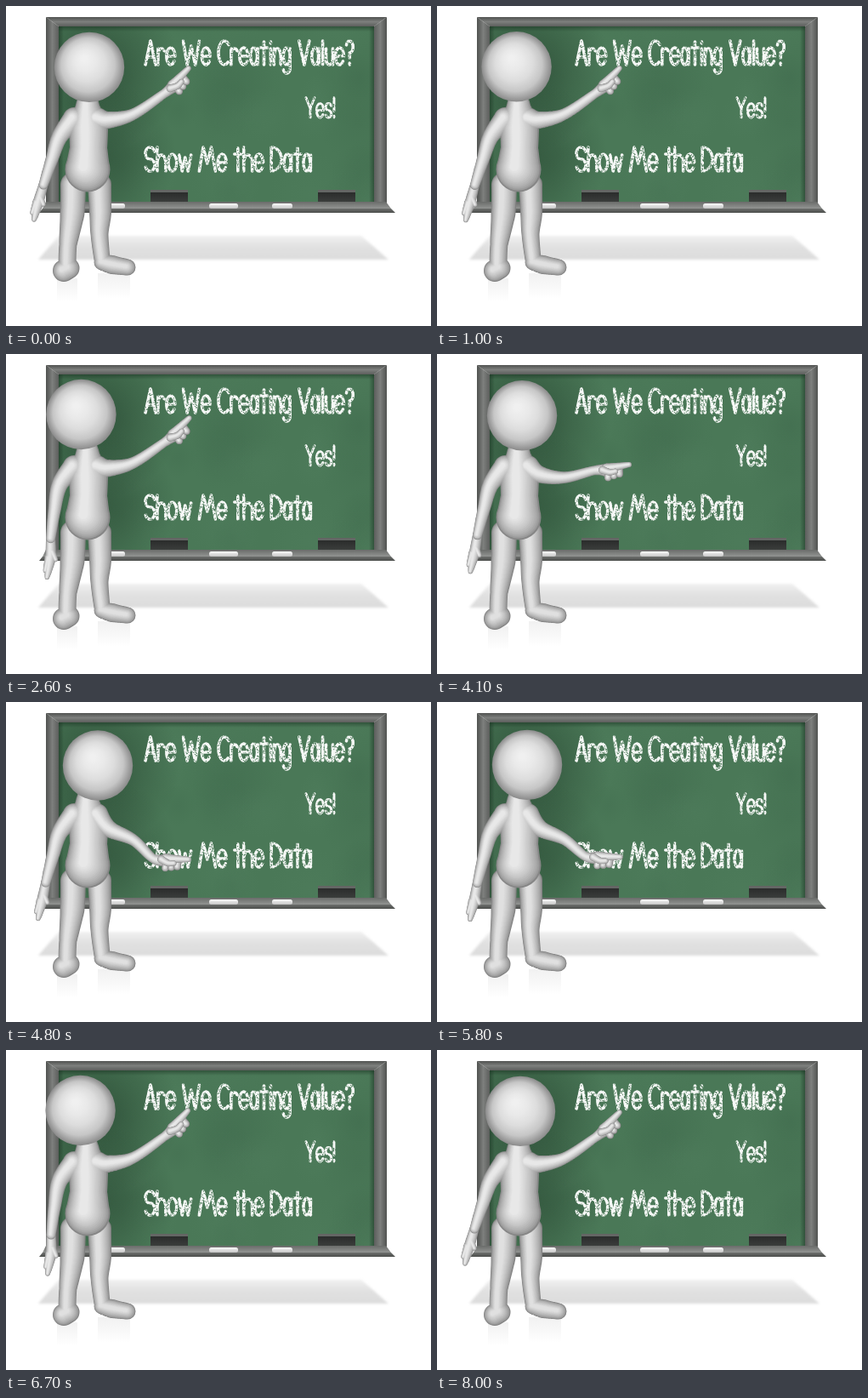
An HTML page with a canvas for the animation above (8.5 s loop, 500 by 376 pixels).

```html
<!DOCTYPE html>
<html lang="en">
<head>
<meta charset="utf-8">
<title>Chalkboard presenter</title>
<style>
html, body { margin: 0; width: 100%; height: 100%; overflow: hidden; background: #fff; }
canvas { display: block; }
</style>
</head>
<body>
<canvas id="stage" width="500" height="376" role="img"
  aria-label="Are We Creating Value? Yes! Show Me the Data"></canvas>
<script>
const W = 500, H = 376, LOOP = 8500, STEP = 100, TURN = Math.PI * 2;
const ctx = document.getElementById('stage').getContext('2d');

function layer() {
  const c = document.createElement('canvas');
  c.width = W;
  c.height = H;
  return c.getContext('2d');
}

let seed = 11;
function rnd() {
  seed = (seed * 16807) % 2147483647;
  return seed / 2147483647;
}

const mix = (a, b, u) => a + (b - a) * u;
const mixPoint = (a, b, u) => a.map((v, i) => mix(v, b[i], u));

function fade(g, x0, y0, x1, y1, ...stops) {
  const f = g.createLinearGradient(x0, y0, x1, y1);
  stops.forEach((c, i) => f.addColorStop(i / (stops.length - 1), c));
  return f;
}

function glow(g, x, y, r, rgb, alpha) {
  const f = g.createRadialGradient(x, y, 0, x, y, r);
  f.addColorStop(0, `rgba(${rgb},${alpha})`);
  f.addColorStop(1, `rgba(${rgb},0)`);
  box(g, x - r, y - r, r * 2, r * 2, f);
}

function box(g, x, y, w, h, fill) {
  g.fillStyle = fill;
  g.fillRect(x, y, w, h);
}

function poly(g, fill, ...p) {
  g.fillStyle = fill;
  g.beginPath();
  for (let i = 0; i < p.length; i += 2) g.lineTo(p[i], p[i + 1]);
  g.fill();
}

// Chalk hand: letters are built from a few strokes, heights measured up from the baseline
const CAP = 28, LOW = 19;
const stem = (x, top, foot = 0) => `M${x} ${-foot}V${-top}`;
const bar = (x, w, y) => `M${x} ${-y}h${w}`;
const zig = (w, ...ys) =>
  'M' + ys.map((y, i) => `${w * i / (ys.length - 1)} ${-y}`).join('L');
// Part of an oval, angles in turns from the right, anticlockwise
function curve(x, y, rx, ry, from, to) {
  const pts = [];
  for (let i = 0; i <= 14; i++) {
    const a = mix(from, to, i / 14) * TURN;
    pts.push(`${x + rx * Math.cos(a)} ${-y - ry * Math.sin(a)}`);
  }
  return 'M' + pts.join('L');
}
const ring = r => curve(r, 10, r, 10, 0, 1);
const arch = w => curve(w / 2, 9, w / 2, 10, 0.5, 0) + stem(w, 9);
const snake = (r, h) => curve(r, h * 0.75, r, h / 4, 0.05, 0.75) + curve(r, h / 4, r, h / 4, 0.25, -0.45);

const GLYPHS = {
  A: [12, zig(12, 0, CAP, 0) + bar(2, 8, 9)],
  C: [12, curve(7, 14, 7, 14, 0.12, 0.86)],
  D: [12, stem(0, CAP) + curve(0, 14, 12, 14, 0.25, -0.25)],
  M: [19, zig(19, 0, CAP, 9, CAP, 0)],
  S: [11, snake(5.5, CAP)],
  V: [12, zig(12, CAP, 0, CAP)],
  W: [19, zig(19, CAP, 0, 22, 0, CAP)],
  Y: [12, zig(12, CAP, 13, CAP) + stem(6, 13)],
  a: [9, ring(4) + stem(8.5, LOW)],
  e: [10, curve(5, 10, 5, 10, 0, 0.9) + bar(0, 10, 10)],
  g: [9, ring(4) + stem(8, LOW, -4) + curve(4, -4, 4, 6, 0, -0.45)],
  h: [10, stem(0, CAP) + arch(10)],
  i: [2, stem(1, LOW) + stem(1, 27, 25)],
  l: [2, stem(1, CAP)],
  n: [8, stem(0, LOW) + arch(8)],
  o: [10, ring(5)],
  r: [7, stem(0, LOW) + curve(4, 12, 4, 7, 0.5, 0.1)],
  s: [8, snake(4, 20)],
  t: [8, stem(4, 27) + bar(0, 8, 20)],
  u: [8, stem(0, LOW, 7) + curve(4, 7, 4, 7, 0.5, 1) + stem(8, LOW)],
  w: [14, zig(14, LOW, 0, 16, 0, LOW)],
  '?': [8, curve(4, 21, 4, 7, 0.45, -0.25) + stem(4, 14, 8) + stem(4, 2)],
  '!': [2, stem(1, CAP, 9) + stem(1, 2)]
};

function write(g, text, x, y, size = 1) {
  g.save();
  g.translate(x, y);
  g.scale(size, size);
  g.lineWidth = 3.6;
  for (const ch of text) {
    const [w, d] = ch === ' ' ? [3.8, ''] : GLYPHS[ch];
    g.stroke(new Path2D(d));
    g.translate(w + 2.9, 0);
  }
  g.restore();
}

function chalk() {
  const g = layer();
  g.strokeStyle = '#f6f8f6';
  g.lineCap = g.lineJoin = 'round';
  write(g, 'Are We Creating Value?', 164, 69);
  write(g, 'Yes!', 353, 131, 0.83);
  write(g, 'Show Me the Data', 164, 194);
  g.globalCompositeOperation = 'destination-out';
  for (let i = 0; i < 7000; i++) {
    g.fillRect(160 + rnd() * 254, 36 + rnd() * 164, 1.1, 1.1);
  }
  return g.canvas;
}

function eraser(g, x) {
  box(g, x, 216, 44, 4, '#646664');
  box(g, x, 219, 44, 12, fade(g, 0, 219, 0, 231, '#2a2c2b', '#3c3f3d'));
}

function stick(g, x, w) {
  g.fillStyle = fade(g, 0, 232, 0, 238, '#fafafa', '#c4c4c4');
  g.beginPath();
  g.roundRect(x, 232, w, 6, 2.5);
  g.fill();
}

function scene() {
  const g = layer();
  box(g, 0, 0, W, H, '#fff');

  // floor shadow and faint reflections of the feet
  g.filter = 'blur(1.5px)';
  poly(g, fade(g, 0, 268, 0, 299, '#f3f3f3', '#e0e0e0', '#dcdcdc'),
    62, 270, 418, 270, 450, 298, 38, 298);
  g.filter = 'none';
  box(g, 60, 320, 24, 28, fade(g, 0, 320, 0, 348, '#f1f1f1', '#ffffff'));
  box(g, 108, 314, 38, 30, fade(g, 0, 314, 0, 344, '#f1f1f1', '#ffffff'));

  // frame
  const rail = ['#505250', '#7d7f7d', '#5c5e5c'];
  poly(g, fade(g, 0, 13, 0, 24, ...rail), 47, 13, 448, 13, 433, 24, 62, 24);
  poly(g, fade(g, 47, 0, 62, 0, ...rail), 47, 13, 62, 24, 62, 232, 47, 237);
  poly(g, fade(g, 448, 0, 433, 0, ...rail), 448, 13, 433, 24, 433, 232, 448, 237);

  // board
  g.save();
  g.beginPath();
  g.rect(62, 24, 371, 207);
  g.clip();
  box(g, 62, 24, 371, 207, '#4a7857');
  for (let i = 0; i < 36; i++) {
    const tone = i % 2 ? '88,134,102' : '54,94,68';
    glow(g, 62 + rnd() * 371, 24 + rnd() * 207, 20 + rnd() * 40, tone, 0.16);
  }
  glow(g, 110, 75, 95, '24,48,32', 0.5);
  glow(g, 115, 175, 85, '24,48,32', 0.4);
  const dark = 'rgba(22,46,30,.5)', clear = 'rgba(22,46,30,0)';
  box(g, 62, 24, 371, 6, fade(g, 0, 24, 0, 30, dark, clear));
  box(g, 62, 24, 6, 207, fade(g, 62, 0, 68, 0, dark, clear));
  box(g, 427, 24, 6, 207, fade(g, 427, 0, 433, 0, clear, dark));
  g.restore();

  eraser(g, 170);
  eraser(g, 367);

  // tray
  poly(g, fade(g, 0, 230, 0, 238, '#6a6c6a', '#929492'),
    47, 230, 447, 230, 453, 238, 43, 238);
  poly(g, fade(g, 0, 238, 0, 243, '#6e706e', '#4b4d4b'),
    43, 238, 453, 238, 458, 243, 39, 243);
  stick(g, 117, 23);
  stick(g, 239, 34);
  stick(g, 313, 24);

  g.drawImage(chalk(), 0, 0);
  return g.canvas;
}

// Point along a Catmull-Rom spline through [x, y, r] points
function along(p, i, t) {
  const a = p[Math.max(i - 1, 0)], b = p[i], c = p[i + 1];
  const d = p[Math.min(i + 2, p.length - 1)];
  return b.map((v, k) => k === 2 ? mix(v, c[2], t) :
    v + 0.5 * t * (c[k] - a[k] + t * (2 * a[k] - 5 * v + 4 * c[k] - d[k] +
    t * (3 * (v - c[k]) + d[k] - a[k]))));
}

function sample(p) {
  const out = [];
  for (let i = 0; i < p.length - 1; i++) {
    const n = Math.ceil(Math.hypot(p[i + 1][0] - p[i][0], p[i + 1][1] - p[i][1])) + 1;
    for (let j = 0; j <= n; j++) out.push(along(p, i, j / n));
  }
  return out;
}

// Soft clay shading: shrinking, brightening copies of all tubes at once
function clay(tubes, rim = 134, core = 232) {
  const dots = tubes.flatMap(sample), passes = 14;
  for (let k = 0; k < passes; k++) {
    const u = k / (passes - 1), s = 1 - 0.8 * u;
    const v = Math.round(mix(rim, core, Math.pow(u, 0.6)));
    ctx.fillStyle = `rgb(${v},${v},${v})`;
    ctx.beginPath();
    for (const [x, y, r] of dots) {
      const cx = x - r * 0.19 * u, cy = y - r * 0.12 * u;
      ctx.moveTo(cx + r * s, cy);
      ctx.arc(cx, cy, r * s, 0, TURN);
    }
    ctx.fill();
  }
}

function head(x, y) {
  const f = ctx.createRadialGradient(x - 6, y - 10, 3, x, y, 41.2);
  ['#f0f0f0', '#e9e9e9', '#dddddd', '#c6c6c6', '#8a8a8a']
    .forEach((c, i) => f.addColorStop(i / 4, c));
  ctx.fillStyle = f;
  ctx.beginPath();
  ctx.arc(x, y, 41.2, 0, TURN);
  ctx.fill();
}

const LEGS = [
  [[79, 210, 15], [78, 243, 14.5], [73, 280, 10.5], [72, 305, 10.5]],
  [[110, 210, 14], [111, 243, 13], [110, 268, 10.5], [113, 298, 9.5]],
  [[74, 308, 12.5], [68, 311, 13]],
  [[113, 301, 9.5], [125, 304, 11], [143, 307, 9.5]]
];
const TORSO = [[96, 110, 11], [96, 122, 15], [97, 145, 23], [97, 168, 22], [96, 192, 26.5]];

// The idle arm swings from held out (0) to hanging down (1)
function idleArm(swing) {
  const elbow = mixPoint([54, 180], [57, 185], swing);
  const wrist = mixPoint([44, 210], [53, 217], swing);
  const [x, y] = mixPoint([38, 231], [53, 240], swing);
  const tip = mixPoint([33, 251], [49, 263], swing);
  clay([
    [[...wrist, 5.5], [x, y, 6.5], [...tip, 2.6]],
    [[x - 2, y, 5], [tip[0] - 2, tip[1] - 8, 2.6]],
    [[x + 2, y - 7, 4], [x + 6, y + 2, 2.6]]
  ]);
  return [[80, 132, 13], [63, 154, 9.5], [...elbow, 7.5], [...wrist, 5.5]];
}

// The pointing arm follows from the height of its fingertip
function pointArm(aim) {
  const drop = aim - 71;
  const tip = [229 - 0.0036 * (aim - 129) ** 2, aim];
  const angle = 0.03 - 0.83 * ((185 - aim) / 114) ** 2;
  const c = Math.cos(angle), s = Math.sin(angle);
  const at = (u, v, r) => [tip[0] - c * u - s * v, tip[1] - s * u + c * v, r];
  const arm = [[107, 132, 13], [121, 134 + drop * 0.13, 10],
    [150, 127 + drop * 0.31, 6.8], at(45, 0, 5.4), at(31, 2, 7.5)];
  const hand = () => {
    for (let i = 0; i < 3; i++) {
      clay([[at(28 - i * 6, 4, 5), at(30 - i * 7, 11 - i, 4.2)]], 118);
    }
    clay([[at(30, 0, 6), at(17, 0, 4.4), at(3, 0, 2.9)]]);
    clay([[at(35, 1, 4.6), at(27, 5, 3.8), at(20, 5, 3)]]);
  };
  return { arm, hand };
}

// time, head x, fingertip y, idle arm swing
const KEYS = [
  [0, 98, 71, 0], [900, 94.4, 71, 0],
  [1600, 87.6, 69, 1], [2500, 87.6, 69, 1],
  [3100, 99.4, 125, 0.4], [4000, 99.4, 125, 0.4],
  [4600, 108, 185, 0.3], [5700, 108, 185, 0.3], [6200, 88.5, 140, 1],
  [6600, 87.6, 69, 1], [7600, 87.6, 69, 1],
  [8000, 98, 71, 0], [LOOP, 98, 71, 0]
];

const slope = (i, k) => KEYS[i + 1]
  && KEYS[i] ? (KEYS[i + 1][k] - KEYS[i][k]) / (KEYS[i + 1][0] - KEYS[i][0]) : 0;

// Speed at a key: zero at rests and turns, else a blend of both sides
function speed(i, k) {
  const a = slope(i - 1, k), b = slope(i, k);
  return a * b > 0 ? 2 * a * b / (a + b) : 0;
}

function valueAt(t, k) {
  const i = KEYS.findIndex(key => key[0] > t) - 1;
  const span = KEYS[i + 1][0] - KEYS[i][0], u = (t - KEYS[i][0]) / span;
  const ease = u * u * (3 - 2 * u), v = 1 - u;
  return mix(KEYS[i][k], KEYS[i + 1][k], ease) +
    span * u * v * (v * speed(i, k) - u * speed(i + 1, k));
}

const backdrop = scene();

function draw(t) {
  const x = valueAt(t, 1);
  const { arm, hand } = pointArm(valueAt(t, 2));
  ctx.drawImage(backdrop, 0, 0);
  clay(LEGS, 128, 224);
  const idle = idleArm(valueAt(t, 3));
  clay([TORSO, idle, arm]);
  hand();
  head(x, 71 + 3.5 * ((x - 88) / 20) ** 2);
}

let shown = -1;
function tick() {
  const t = Math.floor(performance.now() % LOOP / STEP) * STEP;
  if (t !== shown) draw(shown = t);
  requestAnimationFrame(tick);
}
tick();
</script>
</body>
</html>
```
